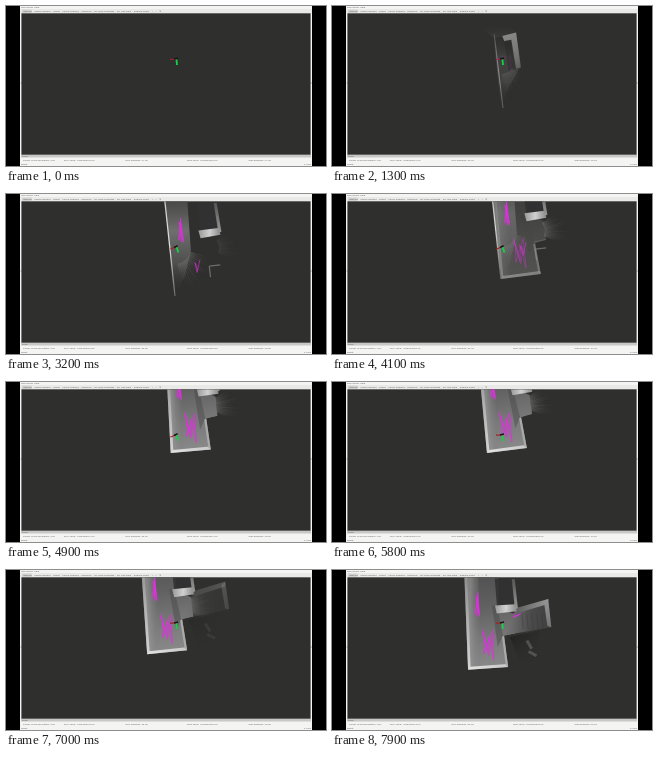
An HTML page with a canvas for the animation above (8 s loop, 320x160 px).

```html
<!DOCTYPE html>
<html>
<head>
<meta charset="utf-8">
<style>
html, body { margin: 0; width: 100%; height: 100%; overflow: hidden; background: #000; }
canvas, svg { position: absolute; left: 0; top: 0; width: 320px; height: 160px; }
text { font: 2.5px "Open Sans", "DejaVu Sans", sans-serif; fill: #555; }
</style>
</head>
<body>
<svg id="ui" viewBox="0 0 320 160">
  <rect x="14" width="292" height="160" fill="#f4f4f3"/>
  <rect x="14" y="3" width="292" height="4.5" fill="#e9e9e8"/>
  <rect x="16" y="3.5" width="9.5" height="3.5" fill="#d2d2d2"/>
  <rect x="15" y="148.5" width="290" height="3" fill="#c8c8c7"/>
  <rect x="15.4" y="7.3" width="289.2" height="141.4" fill="#2f2f2d"/>
  <path d="M15.3 76l-.8 1 .8 1zM304.8 76l.8 1-.8 1z" fill="#555"/>
</svg>
<canvas id="view" width="320" height="160"></canvas>
<script>
const ui = document.getElementById('ui');
const c = document.getElementById('view').getContext('2d');
const LOOP = 8000, STEP = 100;
const PINK = '#e030e0';

function label(x, y, str = '') {
  const el = document.createElementNS('http://www.w3.org/2000/svg', 'text');
  el.setAttribute('x', x);
  el.setAttribute('y', y);
  el.textContent = str;
  return ui.appendChild(el);
}

label(15, 2.3, 'File  Panels  Help');
let toolX = 17;
for (const name of ['Interact', 'Move Camera', 'Select', 'Focus Camera', 'Measure',
  '2D Pose Estimate', '2D Nav Goal', 'Publish Point', '+', '−', '▾']) {
  toolX += label(toolX, 6.1, name).getComputedTextLength() + 2.5;
}
label(16, 150.9, 'Time');
label(17, 155.2, 'Pause');
label(25, 155.2, 'Synchronization: Off');
label(15, 159, 'Reset');
label(298, 159, '31 fps');
const clocks = ['ROS Time', 'ROS Elapsed', 'Wall Time', 'Wall Elapsed']
  .map((name, i) => ({ name, el: label(58 + i * 61.5, 155.2) }));

// Smooth step from 0 to 1 between times a and b.
function ease(t, a, b) {
  const u = Math.min(1, Math.max(0, (t - a) / (b - a)));
  return u * u * (3 - 2 * u);
}
// Fades in around time a and out around time b.
const during = (t, a, b = Infinity) =>
  ease(t, a - 350, a + 350) * (b < LOOP ? 1 - ease(t, b - 350, b + 350) : 1);

function random(seed) {
  return () => (seed = seed * 16807 % 2147483647) / 2147483647;
}

function poly(d, fill) {
  c.fillStyle = fill;
  c.fill(new Path2D(d));
}
function line(d, color, width) {
  c.strokeStyle = color;
  c.lineWidth = width;
  c.stroke(new Path2D(d));
}
function grad(x0, y0, x1, y1, ...stops) {
  const g = c.createLinearGradient(x0, y0, x1, y1);
  stops.forEach((s, i) => g.addColorStop(i / (stops.length - 1), s));
  return g;
}
const gray = (v, a = 1) => `rgba(${v},${v},${v},${a})`;

function group(alpha, draw) {
  if (alpha <= 0) return;
  c.save();
  c.globalAlpha = alpha;
  draw();
  c.restore();
}

// Soft scan rays spreading away from the robot.
function rays(x, y, angle, spread, near, far) {
  const rnd = random(77);
  for (let a = -.5; a <= .5; a += .07) {
    const ca = Math.cos(angle + a * spread), sa = Math.sin(angle + a * spread);
    const r = far * (.7 + .3 * rnd());
    const ends = [x + ca * near, y + sa * near, x + ca * r, y + sa * r];
    line(`M${ends.slice(0, 2)}L${ends.slice(2)}`,
      grad(...ends, gray(120, .5), gray(48, 0)), 1.2);
  }
}

// A zigzag of driven track between the top and bottom of a box.
function scribble(x, y, w, h, count, seed) {
  const rnd = random(seed);
  let d = '';
  for (let i = 0; i < count; i++) {
    const py = y + h * (i % 2 ? .7 + .3 * rnd() : .35 * rnd());
    d += `${i ? 'L' : 'M'}${x + w * rnd()} ${py}`;
  }
  line(d, PINK, .8);
}

function firstScan() {
  poly('M-6 -74L17 -72L20 -40L8 -20L0 0Z',
    grad(0, -76, 0, 0, gray(48, 0), gray(92, .8), gray(95, .7), gray(48, 0)));
  poly('M-16 -79L8 -84L17 -75L-5 -70Z', grad(0, -84, 0, -70, gray(70, 0), gray(88, .5)));
  poly('M5 -66L11 -66L16 -40L9 -34Z', gray(38, .8));
  poly('M3 -72L17 -75L21 -40L16 -39L12 -68L5 -67Z',
    grad(12, -75, 19, -39, '#e4e4e4', '#bbb', '#808080'));
  rays(1, -48, 1.1, .8, 14, 42);
}

function leftStrip() {
  poly('M-9 -110L14 -110L17 -45L10 -18L0 0Z',
    grad(0, -98, 0, 0, gray(80, .7), gray(118, .9), gray(88, .8), gray(48, 0)));
  rays(1, -48, .85, 1.1, 16, 50);
  line('M35 -29L46 -30M35 -29L36 -18', gray(125, .8), 1.2);
}

function room() {
  poly('M-9 -130L27 -130L29 -64L44 -57L46 -38L35 -35L40 -4L0 0Z',
    grad(2, -95, 18, 0, '#505050', '#606060', '#787878', '#8a8a8a'));
  poly('M-9 -130L6 -130L12 -5L3 -3Z', grad(0, 0, 13, 0, gray(175, .5), gray(120, 0)));
  poly('M22 -65L27 -65L34 -35L29 -24Z', gray(65, .4));
  poly('M-9 -130L-6 -130L2.5 -3L0 0Z', grad(0, -100, 0, 0, '#888', '#d5d5d5'));
  poly('M0 0L40 -4L39 -7L2 -3Z', grad(0, 0, 40, 0, '#e2e2e2', '#c8c8c8'));
  poly('M40 -4L35 -35L33 -34L37.5 -6Z', '#aaa');
  line('M34 -36L46 -38.5', '#777', 1.3);
}

function block() {
  poly('M24 -92L43 -92L46 -66L27 -64Z', gray(50, .9));
  poly('M25 -65L45 -67L47 -60L27 -57Z', grad(25, 0, 47, 0, '#999', '#d0d0d0', '#888'));
  poly('M41 -92L44 -92L48 -63L45 -62Z', grad(0, -92, 0, -62, '#555', '#999'));
}

function corridor() {
  poly('M46 -63L78 -73L82 -45L37 -36Z', grad(40, 0, 82, 0, gray(112), gray(75), gray(62)));
  poly('M46 -63L78 -73L78 -68L47 -58Z', grad(46, 0, 78, 0, gray(95), gray(150)));
  poly('M78 -73L82 -45L78 -46L74 -69Z', grad(0, -73, 0, -45, gray(150), gray(115)));
  for (let x = 52; x < 74; x += 5) line(`M${x} -58l2 16`, gray(55, .4), 1);
  poly('M41 -34L70 -41L66 -10L52 -9Z', grad(42, -34, 66, -12, gray(30, .7), gray(48, 0)));
  line('M58 -31L63 -23M60 -20L68 -16', gray(120, .5), 3);
}

function robot(t) {
  c.save();
  c.translate(170, 53);
  c.rotate(-.25 * ease(t, 2200, 3200) + .3 * ease(t, 5000, 5800));
  line('M-6 .5L0 0', `rgb(170,30,${30 + 60 * during(t, 0, 1600)})`, 1.2);
  line('M-2 0L2 -1', '#171717', 1.5);
  line('M.5 .5L1 6', '#10d645', 1.8);
  c.restore();
}

function draw(t) {
  c.clearRect(0, 0, 320, 160);
  c.save();
  c.beginPath();
  c.rect(16, 7.5, 288, 141);
  c.clip();

  // The map slides and turns while the robot stays near the centre.
  c.save();
  c.translate(169 - 33 * ease(t, 4000, 8000),
    102 - 31 * ease(t, 3300, 4800) + 29 * ease(t, 6100, 8000));
  c.rotate(-.025 + .055 * ease(t, 6100, 8000) + .04 * during(t, 4400, 5400));
  c.filter = 'blur(.4px)';
  group(during(t, 1300, 2600), firstScan);
  group(during(t, 2650, 4350), leftStrip);
  group(during(t, 3300), () => rays(32, -47, -.1, 1, 13, 42));
  group(during(t, 4150), room);
  group(ease(t, 6500, 7800), corridor);
  group(during(t, 2750), block);
  group(during(t, 1300, 2600), () =>
    line('M-5 -74L2 0', grad(-5, -74, 2, 0, '#777', '#ddd', '#888'), 1.1));
  group(during(t, 2600, 4350), () =>
    line('M-9 -110L0 0', grad(-9, -100, 0, 0, '#ccc', '#ddd', '#666'), 1.3));
  c.filter = 'none';

  group(.9 * during(t, 2800), () => scribble(5, -78, 6, 28, 9, 11));
  group(.7 * during(t, 2900), () => scribble(20, -36, 9, 14, 4, 5));
  group(.9 * during(t, 4100), () => scribble(13, -41, 13, 32, 9, 23));
  group(.8 * during(t, 7400), () => scribble(43, -58, 9, 5, 5, 31));
  c.restore();

  group(during(t, 1400, 2600), () =>
    line('M168 50L174 51M178 49L179 67', '#a82ba8', .8));
  robot(t);
  c.restore();

  clocks.forEach(({ name, el }, i) => {
    const base = i % 2 ? 21 : 1400000042;
    el.textContent = `${name}: ${(base + t / 250).toFixed(2)}`;
  });
}

function tick() {
  draw(Math.floor(performance.now() % LOOP / STEP) * STEP);
  requestAnimationFrame(tick);
}
tick();
</script>
</body>
</html>
```
